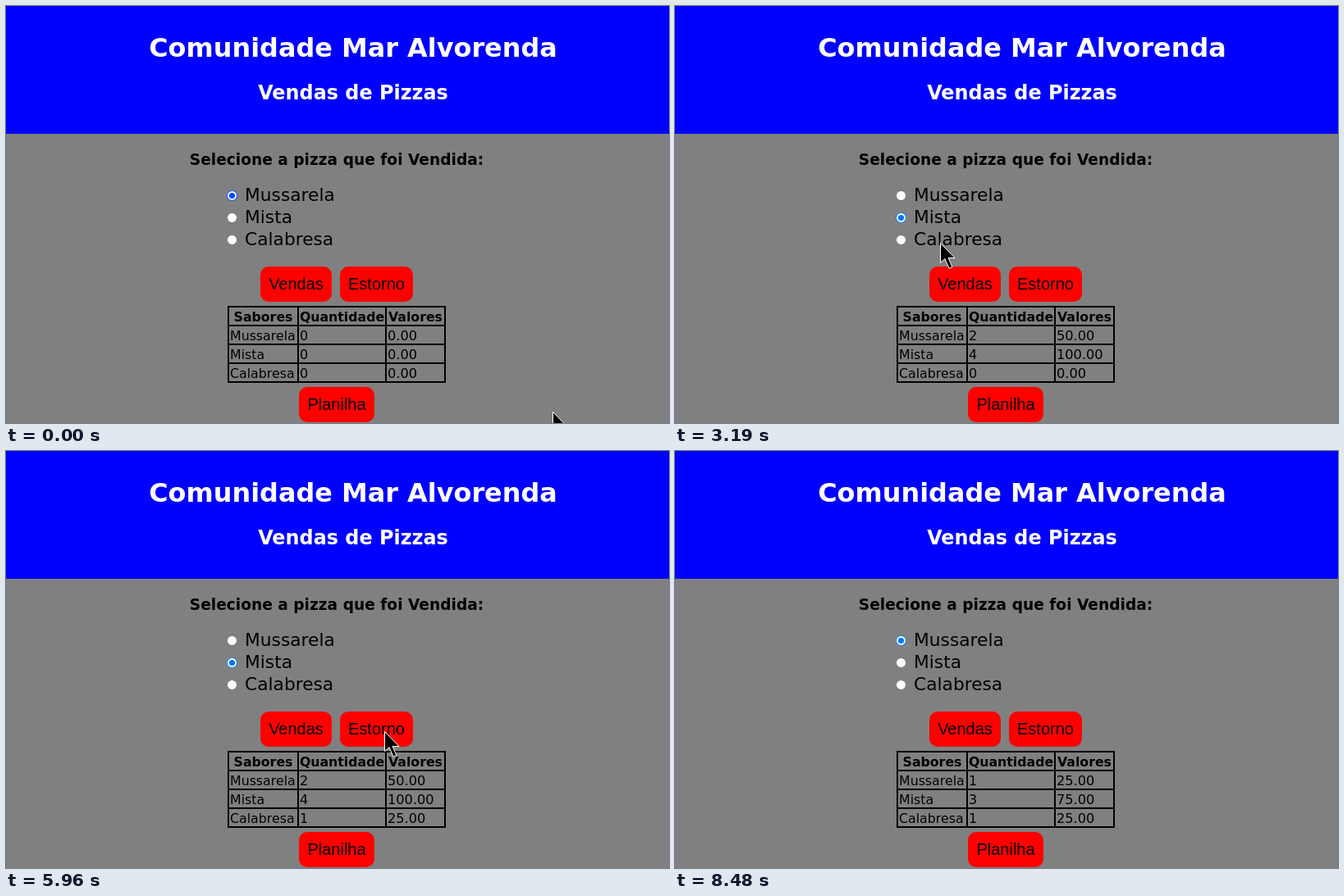
An HTML page that plays this animation: 808 by 509 pixels, repeating every 9.41 s.

```html
<!DOCTYPE html>
<html lang="pt-BR">
<head>
<meta charset="utf-8">
<title>Vendas de Pizzas</title>
<style>
  html, body { margin: 0; width: 100%; height: 100%; overflow: hidden; background: #808080; }
  svg { display: block; font-family: "DejaVu Sans", sans-serif; }
  .bold { font-weight: bold; }
  .button { font: 20px "Liberation Sans", Arial, sans-serif; }
  .middle { text-anchor: middle; }
</style>
</head>
<body>
<svg width="808" height="509" viewBox="0 0 808 509">
  <rect width="808" height="509" fill="#808080"/>
  <rect width="808" height="156" fill="#00f"/>
  <g class="bold middle">
    <text x="423" y="62" font-size="31.9" fill="#fff">Comunidade Mar Alvorenda</text>
    <text x="423" y="114" font-size="23.9" fill="#fff">Vendas de Pizzas</text>
    <text x="403" y="194" font-size="18.6">Selecione a pizza que foi Vendida:</text>
  </g>
  <g id="page"></g>
  <circle id="halo" r="12" fill="#ff0" fill-opacity=".5"/>
  <path id="pointer" d="M.5 .5V24.5L6 19.5L11 31.3L15 29.5L10 18.5H18Z" stroke="#fff"/>
</svg>
<script>
const LOOP = 9410, TICK = 70, PRESS = 140, PRICE = 25;
const TABLE_TOP = 367, ROW = 23, OPTION = 27;
const page = document.getElementById("page");
const halo = document.getElementById("halo");
const pointer = document.getElementById("pointer");

function add(tag, attrs, content = "") {
  const el = document.createElementNS("http://www.w3.org/2000/svg", tag);
  for (const name in attrs) el.setAttribute(name, attrs[name]);
  el.textContent = content;
  return page.appendChild(el);
}

function label(content, x, y, size, cls = "") {
  return add("text", { x, y, "font-size": size, class: cls }, content);
}

function line(d) {
  add("path", { d, stroke: "#000", "stroke-width": 2 });
}

function button(content, x, y, width) {
  add("rect", { x, y, width, height: 43, rx: 10, fill: "#f00" });
  add("text", { x: x + width / 2, y: y + 28, class: "button middle" }, content);
}

button("Vendas", 310, 318, 87);
button("Estorno", 407, 318, 89);
button("Planilha", 357, 465, 92);

const columns = [271, 356, 463, 535];
columns.forEach(x => line(`M${x} ${TABLE_TOP - 1}v${4 * ROW + 2}`));
for (let i = 0; i < 5; i++) line(`M270 ${TABLE_TOP + i * ROW}h266`);
["Sabores", "Quantidade", "Valores"].forEach((title, i) =>
  label(title, (columns[i] + columns[i + 1]) / 2, TABLE_TOP + 18, 15.75, "bold middle"));

const flavours = ["Mussarela", "Mista", "Calabresa"].map((name, i) => {
  const cx = 275.5, cy = 231.5 + OPTION * i, row = TABLE_TOP + 41 + ROW * i;
  label(name, 291, 238 + OPTION * i, 21.75);
  label(name, columns[0] + 2, row, 15.8);
  return {
    ring: add("circle", { cx, cy, r: 6, fill: "#fff" }),
    dot: add("circle", { cx, cy, r: 3.6 }),
    quantity: label("", columns[1] + 2, row, 16),
    value: label("", columns[2] + 2, row, 16.2)
  };
});

const sell = state => state.counts[state.selected]++;
const refund = state => state.counts[state.selected]--;
const select = i => state => Object.assign(state, { selected: i, color: "#0075ff" });
const nothing = () => {};

// Each stop of the pointer: where it arrives and when, then what it clicks
const stops = [
  { arrive: 0, x: 666, y: 495 },
  { arrive: 360, x: 410, y: 306 },
  { arrive: 570, x: 350, y: 334, press: 900, action: sell, times: 2, gap: 330 },
  { arrive: 1690, x: 308, y: 257, press: 1800, action: select(1) },
  { arrive: 2290, x: 338, y: 326, press: 2360, action: sell, times: 4, gap: 150 },
  { arrive: 3150, x: 323, y: 289, press: 3330, action: select(2) },
  { arrive: 3680, x: 350, y: 334, press: 3800, action: sell, times: 2, gap: 260 },
  { arrive: 4500, x: 455, y: 320, press: 4610, action: refund },
  { arrive: 5510, x: 308, y: 257, press: 5510, action: select(1) },
  { arrive: 5900, x: 461, y: 342, press: 6120, action: refund },
  { arrive: 6780, x: 355, y: 238, press: 6850, action: select(0) },
  { arrive: 7260, x: 429, y: 334, press: 7460, action: refund },
  { arrive: 7940, x: 418, y: 480, press: 8140, action: nothing },
  { arrive: 8480, x: 640, y: 512 }
];

const clicks = [];
for (const stop of stops) {
  const { arrive, press, action, times = 1, gap = 0 } = stop;
  stop.leave = arrive;
  if (!action) continue;
  for (let i = 0; i < times; i++) clicks.push({ start: press + i * gap, action });
  stop.leave = press + (times - 1) * gap + PRESS;
}

const smooth = u => u * u * (3 - 2 * u);

function pointerAt(t) {
  const next = stops.findIndex(stop => stop.arrive > t);
  const to = stops.at(next), from = next < 0 ? to : stops[next - 1];
  const moved = Math.floor(Math.max(0, t - from.leave) / TICK) * TICK;
  const u = moved && smooth(moved / (to.arrive - from.leave));
  return [from.x + (to.x - from.x) * u, from.y + (to.y - from.y) * u].map(Math.round);
}

function salesAt(t) {
  const state = { counts: [0, 0, 0], selected: 0, color: "#0048ff" };
  for (const { start, action } of clicks) if (t >= start + TICK) action(state);
  return state;
}

function show(el, visible) {
  el.setAttribute("visibility", visible ? "visible" : "hidden");
}

function draw(t) {
  const { counts, selected, color } = salesAt(t);
  flavours.forEach((f, i) => {
    f.ring.setAttribute("stroke", i === selected ? color : "#767676");
    f.dot.setAttribute("fill", i === selected ? color : "none");
    f.quantity.textContent = counts[i];
    f.value.textContent = (counts[i] * PRICE).toFixed(2);
  });
  const place = `translate(${pointerAt(t)})`;
  pointer.setAttribute("transform", place);
  halo.setAttribute("transform", place);
  show(pointer, t < stops.at(-1).arrive);
  show(halo, clicks.some(({ start }) => t >= start && t < start + PRESS));
}

const begin = performance.now();
function frame() {
  draw((performance.now() - begin) % LOOP);
  requestAnimationFrame(frame);
}
frame();
</script>
</body>
</html>
```
